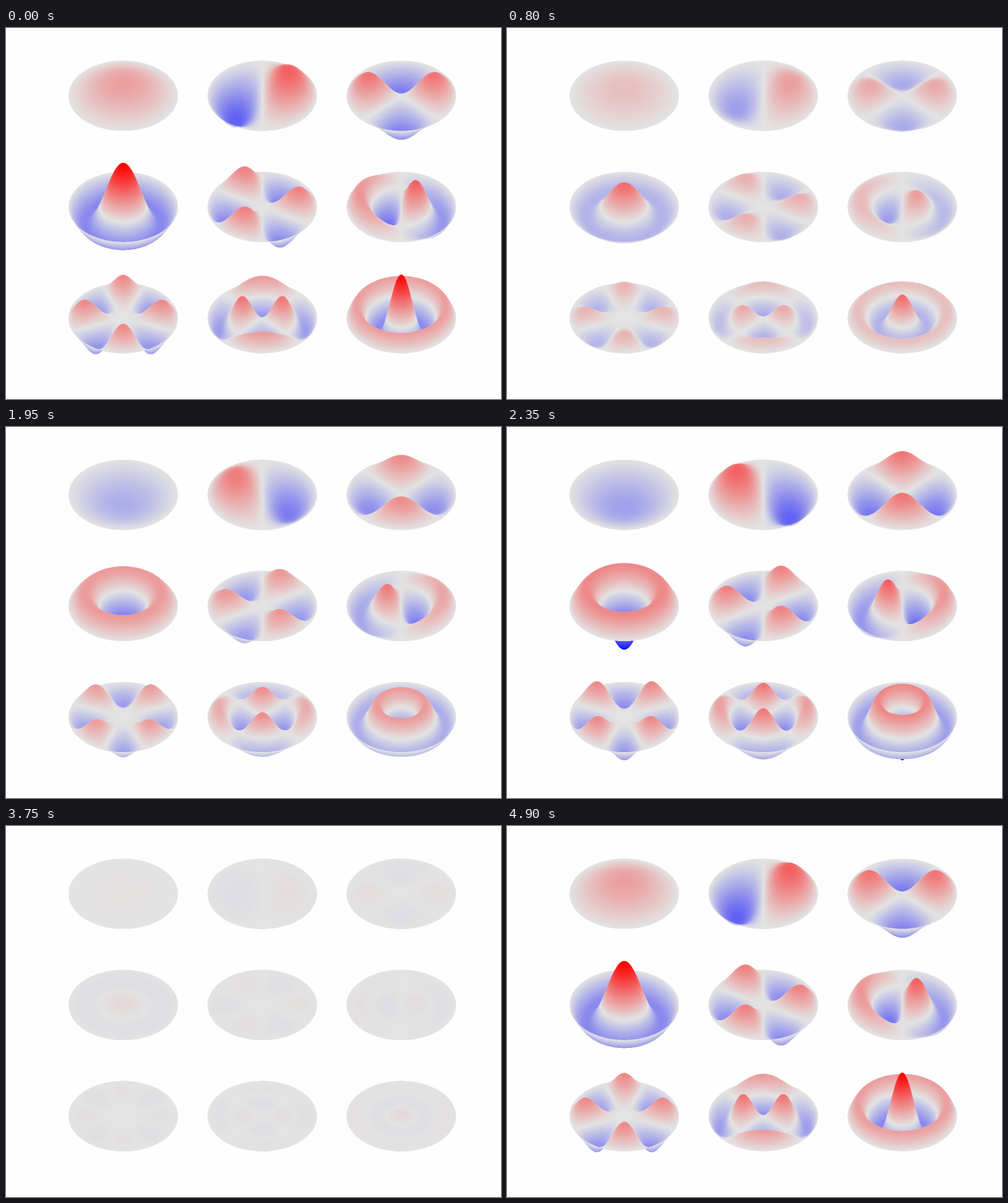
A matplotlib script that plays this animation: 700 px wide and 525 px high, repeating every 4.95 s.

```python
import numpy as np
import matplotlib.pyplot as plt
from matplotlib.animation import FuncAnimation

W, H, DPI = 700, 525, 100
FRAMES, INTERVAL = 99, 50
SS = 2                        # supersampling per axis
RX, RY, LIFT = 77.4, 49.7, 61.0   # disk radii and height of one unit, px
LEVELS = 1000                 # colour steps on either side of zero

# (angular order, zero of the Bessel function, amplitude)
MODES = [
    (0, 2.4048, 0.3), (1, 3.8317, 1), (2, 5.1356, 1),
    (0, 5.5201, 1), (3, 6.3802, 1), (1, 7.0156, 1),
    (4, 7.5883, 1), (2, 8.4172, 1), (0, 8.6537, 1),
]


def bessel(n, x):
    tau = (np.arange(200) + 0.5) * np.pi / 200
    return np.cos(n * tau - np.outer(x, np.sin(tau))).mean(axis=1)


def make_palette():
    """Blue - grey - red, with the background as the last entry."""
    grey = np.full(3, 227.0)
    s = np.linspace(-1, 1, 2 * LEVELS + 1)[:, None]
    end = np.where(s < 0, [0, 0, 255], [255, 0, 0])
    ramp = grey + (end - grey) * np.abs(s)
    return np.vstack([ramp, [254, 254, 254]]).round().astype(np.uint16)


def sample_drum(index):
    """Columns, flat screen heights and mode shape, ordered back to front."""
    n, k, amp = MODES[index]
    row, col = divmod(index, 3)
    cx = 362.4 + (col - 1) * 196.6
    cy = 253.3 + (row - 1) * 157.3
    x = np.arange(int((cx - RX) * SS), int((cx + RX) * SS) + 1)
    steps = int(2 * SS * 1.15 * (RY + LIFT * 0.58 * k * amp))
    u, v = np.meshgrid(((x + 0.5) / SS - cx) / RX, np.linspace(1, -1, steps))
    r = np.hypot(u, v)
    inside = r <= 1
    cols = np.broadcast_to(x, u.shape)[inside]
    u, v, r = u[inside], v[inside], r[inside]
    grid = np.linspace(0, 1, 600)
    shape = amp * np.interp(r, grid, bessel(n, k * grid))
    shape *= np.cos(n * np.arctan2(v, u))
    flat = (cy - v * RY) * SS
    return cols.astype(np.int32), flat.astype(np.float32), shape.astype(np.float32)


cols, flat, shape = map(np.concatenate, zip(*map(sample_drum, range(9))))
palette = make_palette()


def render(swing):
    canvas = np.full(W * H * SS * SS, 2 * LEVELS + 1, np.uint16)
    h = shape * np.float32(swing)
    rows = (flat - h * np.float32(LIFT * SS)).astype(np.int32)
    # nearer samples come later and cover the farther ones
    canvas[rows * (W * SS) + cols] = (h * LEVELS + (LEVELS + 0.5)).astype(np.uint16)
    rgb = palette[canvas.reshape(H * SS, W * SS)]
    total = sum(rgb[i::SS, j::SS] for i in range(SS) for j in range(SS))
    return (total // (SS * SS)).astype(np.uint8)


# the swing is symmetric in time, so half a loop is enough
images = [render(np.cos(2 * np.pi * i / FRAMES)) for i in range(FRAMES // 2 + 1)]

fig = plt.figure(figsize=(W / DPI, H / DPI), dpi=DPI)
ax = fig.add_axes([0, 0, 1, 1])
ax.axis("off")
picture = ax.imshow(images[0], interpolation="nearest", aspect="auto")


def update(i):
    picture.set_data(images[min(i, FRAMES - i)])
    return (picture,)


anim = FuncAnimation(fig, update, frames=FRAMES, interval=INTERVAL,
                     repeat=True, repeat_delay=0)
plt.show()
```
